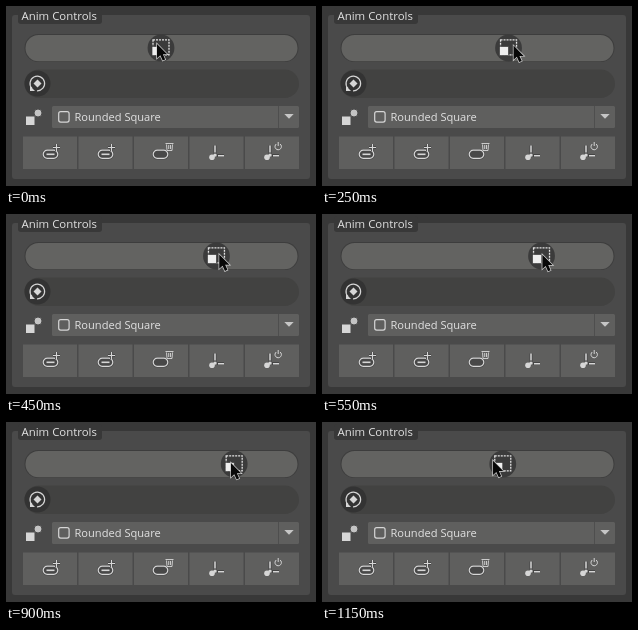
An HTML page that plays this animation: 310x180 px, repeating every 1200 ms.

```html
<!DOCTYPE html>
<html lang="en">
<head>
<meta charset="utf-8">
<title>Anim Controls</title>
<style>
html, body { margin: 0; width: 100%; height: 100%; overflow: hidden; background: #383838; }
svg { display: block; width: 310px; height: 180px; }
text { font: 500 11.4px "Open Sans", "Noto Sans", sans-serif; fill: #e2e2e2; }
.btn { fill: #5f5f5e; }
.line { fill: none; stroke: #d6d6d6; stroke-width: 1.2; }
.halo { fill: none; stroke: #444; stroke-width: 3; }
.light { fill: #d6d6d6; }
</style>
</head>
<body>
<svg viewBox="0 0 310 180">
  <defs>
    <g id="pill">
      <rect x="-8.5" y="-5" width="17" height="10.5" rx="5.2" fill="#484848"/>
      <rect x="-7.3" y="-3.8" width="14.6" height="8.2" rx="4.1" class="line" stroke-width="1.4"/>
    </g>
    <g id="add">
      <use href="#pill"/>
      <path d="M-4 .3H4" class="line" style="stroke-width:1.6"/>
      <path id="plus" d="M6-10v7M2.5-6.5h7" class="halo"/>
      <path d="M6-10v7M2.5-6.5h7" class="line"/>
    </g>
    <g id="axes">
      <path d="M0-9V1M2 1H9M0 1L-3 3" class="halo"/>
      <path d="M0-9V-2M3 1.2H9" class="line" style="stroke-width:1.5"/>
      <path d="M0 1L-3 3" class="line"/>
      <circle cx="-3" cy="2.8" r="2.8" class="light"/>
      <circle cy=".6" r="1.7" class="light"/>
    </g>
  </defs>

  <rect x="6" y="9" width="298" height="164" rx="3" fill="#4a4a4a"/>
  <rect x="12" y="2" width="84" height="16" rx="3" fill="#383838"/>
  <text x="15.5" y="13.5">Anim Controls</text>

  <rect x="18.5" y="28" width="274" height="28" rx="14" fill="#3d3d3d"/>
  <rect x="19.5" y="29" width="272" height="26.3" rx="13.1" fill="#636361"/>
  <rect x="18.5" y="63.5" width="274.5" height="28.5" rx="14.2" fill="#424241"/>

  <circle cx="31.5" cy="77.5" r="13" fill="#333"/>
  <path d="M26 82.5A7.3 7.3 0 1 1 31 84.8" class="line"/>
  <path d="M24 80v5h5z" class="light"/>
  <path d="M31.5 73.5l4 4-4 4-4-4z" class="light"/>

  <rect x="20" y="110.5" width="8.5" height="8.5" class="light"/>
  <circle cx="32" cy="107" r="4" fill="#c4c4c4" stroke="#4a4a4a"/>

  <rect x="46" y="100" width="247" height="22" rx="1.5" class="btn"/>
  <path d="M272.5 100v22" stroke="#4e4e4e"/>
  <rect x="52.7" y="105.7" width="10.4" height="10.4" rx="2" class="line"/>
  <text x="68.5" y="115" style="font-size:11.1px">Rounded Square</text>
  <path d="M278.3 108h9.4l-4.7 4.7z" fill="#c6c6c6"/>

  <g id="buttons"></g>
  <use href="#add" x="44.5" y="148"/>
  <use href="#add" x="99.5" y="148"/>
  <use href="#pill" x="154.5" y="148"/>
  <path d="M159.5 137.5h8M160.5 138.5l.5 6h5l.5-6M162.7 139v4M164.5 139v4" class="line" style="stroke-width:.9"/>
  <use href="#axes" x="209" y="148.5"/>
  <use href="#axes" x="264" y="148.5"/>
  <path d="M270.3 138a3.2 3.2 0 1 0 3.8 0M272.2 136v4" class="line" style="stroke-width:1"/>

  <g id="knob">
    <circle r="13.4" fill="#3b3b3b"/>
    <rect x="-8" y="-8.2" width="16" height="15" fill="none" stroke="#e4e4e4" stroke-width="1.3" stroke-dasharray="2 1"/>
    <rect x="-9" y="-1.5" width="9" height="9" fill="#eee" stroke="#3b3b3b" stroke-width=".7"/>
  </g>
  <path id="cursor" d="M0 0V14.2L3.3 11.2L5.7 16.5L8.2 15.4L5.9 10.3H10.2Z" fill="#080808" stroke="#d0d0d0" stroke-width="1.4" paint-order="stroke"/>
</svg>
<script>
const LOOP = 1200, STEP = 50, ARRIVE = 750, LEAVE = 850;
const $ = id => document.getElementById(id);

$('buttons').innerHTML = [0, 1, 2, 3, 4].map(i =>
  `<rect x="${17 + i * 55.5}" y="130.5" width="54" height="32.5" class="btn"/>`).join('');

const place = (id, x, y) => $(id).setAttribute('transform', `translate(${x} ${y})`);
const easeOut = (u, soft, power) => 1 - (1 - u ** soft) ** power;

function draw(now) {
  const t = Math.floor(now % LOOP / STEP) * STEP;
  const go = Math.min(t / ARRIVE, 1);
  const back = Math.max((t - LEAVE) / (LOOP - LEAVE), 0);
  // The knob trails the pointer both ways.
  const pointer = easeOut(go, 1, 1.9) - back ** 2;
  const knob = easeOut(go, 1.2, 1.8) - back ** 2.8;
  place('knob', 155 + 73.5 * knob, 42);
  place('cursor', 151 + 75.5 * pointer, 38 + 3 * pointer);
}

const start = performance.now();
function tick() {
  draw(performance.now() - start);
  requestAnimationFrame(tick);
}
tick();
</script>
</body>
</html>
```
